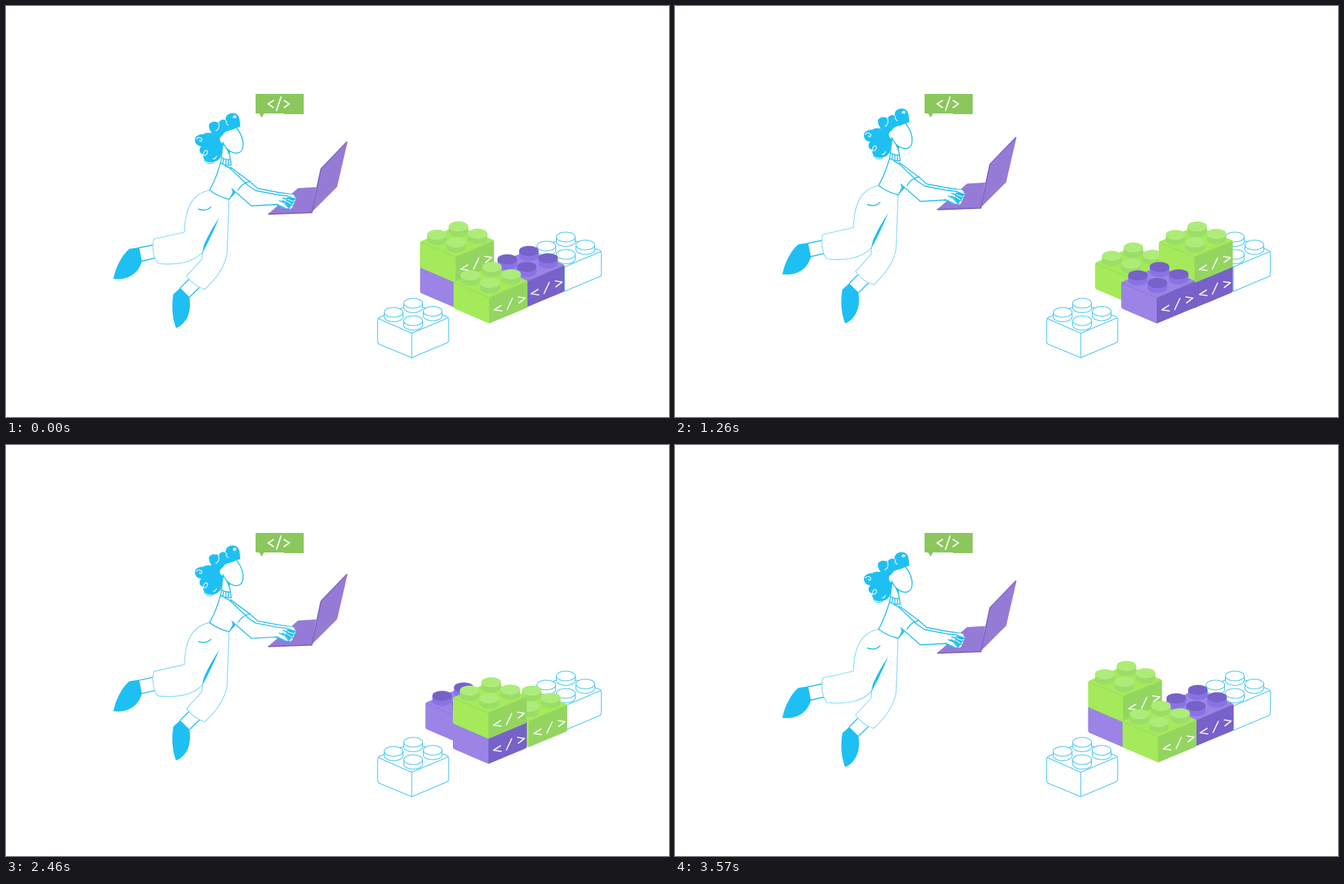
An HTML page for the animation above (3.6 s loop, 951x589 px).

```html
<!DOCTYPE html>
<html lang="en">
<head>
<meta charset="utf-8">
<title>Building blocks</title>
<style>
html, body { margin: 0; width: 100%; height: 100%; overflow: hidden; background: #fff; }
svg { display: block; width: 951px; height: 589px; }
.line { fill: none; stroke: #1fbcf0; stroke-width: 1.4; stroke-linecap: round; stroke-linejoin: round; }
.soft { fill: #fff; stroke: #7dd6f6; stroke-width: 1.1; stroke-linejoin: round; }
.skin { fill: #fff; }
.blue { fill: #1ec0f3; }
.curl { fill: none; stroke: #fff; stroke-width: 1.1; stroke-linecap: round; }
.code { fill: none; stroke: #fff; stroke-linecap: round; stroke-linejoin: round; }
.wire { fill: #fff; stroke: #3fc4f2; stroke-width: 1.1; stroke-linejoin: round; }
</style>
</head>
<body>
<svg viewBox="0 0 951 589">
  <g id="wires"></g>
  <g id="blocks"></g>

  <path fill="#8bc75d" d="M358 126H427V155H399V154H370L367 160L363 154H358Z"/>
  <path class="code" stroke-width="2" d="M383.500 135.500L376 140.300L383.500 145.500M394.500 130.500L388 149.500M399 135.500L406.500 140.300L399 145.500"/>

  <g id="person">
    <!-- shoes and ankles -->
    <path class="blue" d="M191 346L177 348C166 357 157 375 154 391C174 393 189 385 195 366Z"/>
    <path class="line" d="M191 346.500L213 342M195 365.500L215 361"/>
    <path class="blue" d="M250 404L240 413C237 432 239 449 244 461.500C258 456 267 440 263 417Z"/>
    <path class="line" d="M250 404L264 390M263.500 417L278 403"/>
    <!-- trousers -->
    <path class="soft" d="M292 264C267 269 257 289 256 324L212 334C209 345 211 361 218 369C245 372 268 368 282 353L281 363L259 387C266 397 275 403 285 406C302 391 313 374 317 356L320 277Z"/>
    <path class="blue" d="M306 303Q293 322 284 342L281 355Q292 336 306 303Z"/>
    <path class="line" d="M276 291Q287 295 294 288"/>
    <!-- laptop -->
    <path fill="#957bd6" d="M376 298L419 261L445 259.500L438 296Z"/>
    <path fill="#957bd6" d="M438 296L452 233L490 194L475 259Z"/>
    <path fill="none" stroke="#8067c1" stroke-width="2" d="M376 298.200L438.500 296L452 233"/>
    <path fill="none" stroke="#7e66c4" stroke-width="1.500" d="M452 233L489 194.500"/>
    <!-- torso and arms -->
    <path class="skin" d="M308 224L292 264Q306 274 320 277L328 266L352 287L388 285L408 291L414 271L361 262L323 231Z"/>
    <path class="line" d="M308 224Q302 246 292 264Q306 274 320 277L328 267"/>
    <path class="line" d="M322 231L349 251L361 261.500L390 267L414 270.500"/>
    <path class="line" d="M314 229Q319 230 324 235L347 257M350 251Q337 255 333 264M347 257L358 264.500L389 270.500"/>
    <path class="line" d="M324 262L352 286.500L388 284.500Q394 289 401 290"/>
    <path class="blue" d="M324 262L329 268L320 277L325 267Z"/>
    <path class="skin" d="M388 269L411 270L416 276L410 290L399 290L388 284Z"/>
    <path class="line" d="M389 270.500L403 272L415 277M397 275L414 281M396 279L411 286M392 279L399 282L406 290M388 284L401 290"/>
    <path class="blue" d="M403 274L415 275.500Q416 278 413 278.500L412 283L409 286L407 290L401 283Z"/>
    <path class="curl" d="M404 277L412 280M403 280L409 284"/>
    <!-- neck and head -->
    <path class="skin" d="M310 194L308 226L322 229L321 210Z"/>
    <path class="line" d="M311 197L309 217M319 206L322 220M309 217Q315 221 322 220L323 228Q314 229 308 225ZM312 219L311 226M315.500 220V227M319 220.500V227"/>
    <path class="blue" d="M311 194L322 208L320 213Z"/>
    <path class="skin" d="M313 179L331 175C338 184 341 192 340 201C339 211 331 213 323 209C317 206 313 200 311 195Z"/>
    <path class="line" d="M331 175C338 184 341 192 340 201C339 211 331 213 323 209C317 206 313 200 311 195"/>
    <path class="blue" d="M336 173C336 167 335 159 332 156C328 152 319 153 316 158C315 160 315 162 315 164C311 161 306 164 305 168C301 164 292 166 291 171C291 176 293 179 295 182C290 182 286 181 283 184C277 183 271 187 271 192C271 197 275 201 280 201C276 206 277 211 283 213C282 220 287 224 293 224C300 224 306 221 308 216L312 198C308 196 306 193 307 189C308 186 311 186 312 183C315 179 319 179 322 178C327 177 331 174 336 173Z"/>
    <path class="line" style="stroke-width:1" d="M284 221Q290 229 298 224"/>
    <path class="curl" d="M326 160C325 157 330 156 330 159C329 162 325 160 328 158M316 164Q315 169 319 171M305 168C307 173 304 178 301 179M273 191C275 187 281 188 281 192C280 195 277 194 278 192M283 213C284 206 289 205 289 210C288 214 285 215 283 213M297 219Q300 220 302 215"/>
  </g>
</svg>
<script>
const LOOP = 3600, STEP = 30, MOVE = 300, RISE = 36;
const $ = id => document.getElementById(id);

function add(parent, tag, attrs = {}) {
  const el = document.createElementNS('http://www.w3.org/2000/svg', tag);
  for (const key in attrs) el.setAttribute(key, attrs[key]);
  parent.append(el);
  return el;
}

const place = (el, x, y) => el.setAttribute('transform', `translate(${x.toFixed(2)} ${y.toFixed(2)})`);

// The origin of every block is the bottom of its front corner.
function stud(g, x, y, rx, ry, h, side, top) {
  add(g, 'path', { ...side, d: `M${x - rx} ${y}v${h}a${rx} ${ry} 0 0 0 ${2 * rx} 0v${-h}z` });
  add(g, 'ellipse', { ...top, cx: x, cy: y, rx, ry });
}

function solid(parent, c) {
  const g = add(parent, 'g');
  add(g, 'path', { fill: c.left, d: 'M0 0L-49 -21Q-51 -22 -51 -24V-57Q-51 -59 -49 -60L1 -81Q3 -82 5 -81L53 -62Q55 -61 55 -59L0 -37Z' });
  add(g, 'path', { fill: c.right, d: 'M0 0V-37L55 -60V-25Q55 -23 53 -22Z' });
  add(g, 'path', { fill: 'none', stroke: c.edge, 'stroke-width': .8, d: 'M-50 -58L0 -37L54 -60' });
  for (const [x, y] of [[4, -81], [31.5, -70.5], [-27, -69], [1, -58]])
    stud(g, x, y, 14, 7.3, 7.5, { fill: c.side }, { fill: c.stud });
  add(g, 'path', { class: 'code', 'stroke-width': 1.6, transform: 'translate(29.300 -28)',
    d: 'M-12 2L-22 8.500L-11 10M4 -8L-3.500 8M12.500 -10L22.500 -8.500L13.500 -1.500' });
  return g;
}

function wire(x, y) {
  const g = add($('wires'), 'g', { class: 'wire' });
  place(g, x, y);
  add(g, 'path', { d: 'M0 0L-46 -19Q-49 -20 -49 -24V-53Q-49 -56 -46 -58L0 -77Q2 -78 4 -77L50 -59Q53 -58 53 -54V-26Q53 -22 50 -21Z' });
  add(g, 'path', { d: 'M-48 -56L0 -35L52 -57M0 -35V0', fill: 'none' });
  for (const [sx, sy] of [[2, -78], [30, -66.5], [-26, -65], [2, -53]])
    stud(g, sx, sy, 13.5, 7, 6.5, {}, {});
}

const green = { left: '#a4ea5b', right: '#94d562', edge: '#93d857', side: '#9bdd69', stud: '#aeec79' };
const purple = { left: '#9b84e5', right: '#7662c8', edge: '#8972d6', side: '#8873e6', stud: '#7662c8' };

// Each stop list runs west, north, east, south.
const bricks = [
  { start: 0, color: purple, stops: [[643.5, 433.5], [696, 409.5], [745, 433], [692, 457]], lid: green },
  { start: 1200, color: green, stops: [[641.5, 431.5], [697, 411], [750, 433], [693, 455]] },
  { start: 2400, color: purple, stops: [[640.5, 433], [696.5, 412], [746, 432], [691, 455]] }
];
const departures = [0, 900, 1800, 2700];

wire(801, 409);
wire(582, 504);
for (const b of bricks) {
  b.el = add($('blocks'), 'g');
  solid(b.el, b.color);
  if (b.lid) place(solid(b.el, b.lid), 0, -RISE);
}

const smooth = p => p * p * (3 - 2 * p);

function position(b, time) {
  const t = (time - b.start + LOOP) % LOOP;
  const i = Math.floor(t / 900);
  const p = smooth(Math.min(1, (t - departures[i]) / MOVE));
  const from = b.stops[i], to = b.stops[(i + 1) % 4];
  return from.map((v, k) => v + (to[k] - v) * p);
}

let order = '';
function draw() {
  const time = (Math.floor(performance.now() / STEP) * STEP + STEP) % LOOP;
  place($('person'), 0, -5.4 * (1 - Math.cos(Math.PI * time / 900)));
  for (const b of bricks) {
    [b.x, b.y] = position(b, time);
    place(b.el, b.x, b.y);
  }
  const sorted = [...bricks].sort((a, b) => a.y - b.y);
  const key = sorted.map(b => b.start).join();
  if (key !== order) $('blocks').append(...sorted.map(b => b.el));
  order = key;
  requestAnimationFrame(draw);
}
draw();
</script>
</body>
</html>
```
